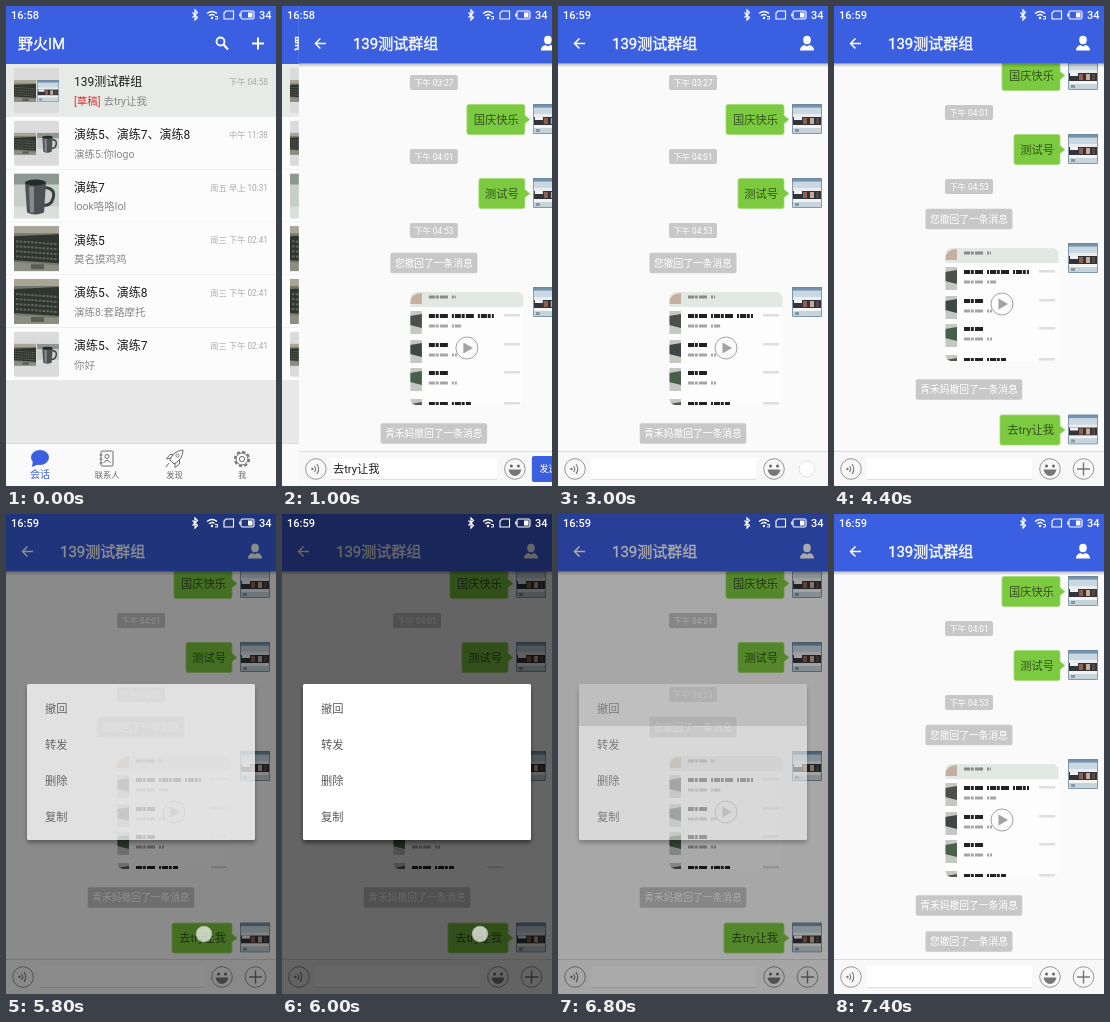
These frames come from a looping animation (270 by 480 pixels, 8000 ms). An HTML page:

```html
<!DOCTYPE html>
<html lang="zh-CN">
<head>
<meta charset="utf-8">
<title>野火IM</title>
<style>
  html, body { margin: 0; width: 100%; height: 100%; overflow: hidden; }
  svg { display: block; width: 100%; height: 100%; font-family: Roboto, 'Noto Sans CJK SC', 'Noto Sans CJK', sans-serif; }
</style>
</head>
<body>
<svg id="stage" viewBox="0 0 270 480" preserveAspectRatio="none"></svg>
<script>
const BLUE = '#3b5fe1', LOOP = 8000, STEP = 200;
const DRAFT = '去try让我';

// ---- drawing helpers ----
const rect = (x, y, w, h, fill, r = 0, more = '') =>
  `<rect x="${x}" y="${y}" width="${w}" height="${h}" rx="${r}" fill="${fill}" ${more}/>`;
const circle = (x, y, r, more) => `<circle cx="${x}" cy="${y}" r="${r}" ${more}/>`;
const line = (d, color, w = 1, more = '') =>
  `<path d="${d}" fill="none" stroke="${color}" stroke-width="${w}" ${more}/>`;
const shape = (d, fill) => `<path d="${d}" fill="${fill}"/>`;
const text = (x, cy, size, str, fill, anchor = 'start', more = '') =>
  `<text x="${x}" y="${cy + size * 0.37}" font-size="${size}" fill="${fill}" text-anchor="${anchor}" ${more}>${str}</text>`;
const heading = (x, str) => text(x, 37.7, 15, str, '#fff', 'start', 'stroke="#fff" stroke-width=".35"');
const group = (id, body) => `<g id="${id}">${body}</g>`;
const use = (id, x, y, s) => `<use href="#${id}" x="${x}" y="${y}" width="${s}" height="${s}"/>`;

// ---- shared pictures ----
const symbol = (id, size, body) => `<symbol id="${id}" viewBox="0 0 ${size} ${size}">${body}</symbol>`;
const keys = [15, 20, 25, 30].map(y =>
  line(`M2 ${y}L44 ${y + 3}`, '#5d665a', 2, 'stroke-dasharray="2.6 1.2"')).join('');
const defs = `<defs>
  ${symbol('keyboard', 45, rect(0, 0, 45, 45, '#75786c') + rect(0, 0, 45, 7, '#a9a594') +
    shape('M0 10L45 8V37L0 34Z', '#30362f') + keys + shape('M0 36L45 39V45H0Z', '#8d8e82') +
    rect(17, 38, 13, 5, '#5b5d55'))}
  ${symbol('cup', 45, rect(0, 0, 45, 45, '#c8ceca') + rect(0, 0, 45, 11, '#8d9792') +
    rect(0, 33, 45, 12, '#dcdeda') + line('M31 14Q42 15 39 25Q37 32 30 32', '#3b4040', 3) +
    shape('M11 9H32L30 39Q21 43 13 39Z', '#4c5153') + shape('M15 13H20L20 39H16Z', '#858b8c') +
    `<ellipse cx="21.5" cy="9" rx="10.5" ry="3" fill="#24292a"/>`)}
  ${symbol('screen', 30, rect(0, 0, 30, 30, '#b9cbd8') + rect(0, 0, 30, 3.5, '#7593ad') +
    rect(1, 4, 28, 6, '#c9d8e2') + rect(1, 10, 28, 4, '#e9edef') + rect(1, 13, 28, 8, '#33343a') +
    rect(2, 13, 8, 3, '#f2f2f2') + rect(11, 14, 4, 6, '#8f6052') + rect(18, 14, 4, 6, '#c8a994') +
    rect(24, 14, 3, 6, '#57484a') + rect(1, 21, 28, 3, '#f2f3f3') + rect(1, 24, 28, 5, '#c7d4dc') +
    rect(3, 25, 4, 3, '#8298a9') + rect(.4, .4, 29.2, 29.2, 'none', 1, 'stroke="#6d8497" stroke-width=".8"'))}
  <filter id="soft" x="-20%" y="-20%" width="140%" height="150%"><feGaussianBlur stdDeviation="2"/></filter>
  <clipPath id="photoClip">${rect(111.5, 286, 113, 113, '#000', 6)}</clipPath>
  <linearGradient id="shade" x2="0" y2="1"><stop stop-color="#000" stop-opacity=".25"/><stop offset="1" stop-color="#000" stop-opacity="0"/></linearGradient>
</defs>`;

// ---- conversation list ----
const rows = [
  ['139测试群组', DRAFT, '下午 04:58', 'keyboard', 'screen'],
  ['演练5、演练7、演练8', '演练5:你logo', '中午 11:38', 'keyboard', 'cup'],
  ['演练7', 'look咯咯lol', '周五 早上 10:31', 'cup'],
  ['演练5', '莫名摸鸡鸡', '周三 下午 02:41', 'keyboard'],
  ['演练5、演练8', '演练8:套路摩托', '周三 下午 02:41', 'keyboard'],
  ['演练5、演练7', '你好', '周三 下午 02:41', 'keyboard', 'cup'],
];
function listRow([name, last, time, a, b], i) {
  const y = 58 + 52.75 * i;
  const pic = b
    ? rect(8, y + 4, 45, 45, '#dadbda', 2) + use(a, 8, y + 16, 22) + use(b, 31, y + 16, 22)
    : use(a, 8, y + 4, 45);
  const sub = i ? text(68, y + 37, 10.5, last, '#888')
    : text(68, y + 37, 10.5, '[草稿]', '#e03030') + text(97.5, y + 37, 10.5, last, '#888');
  return rect(0, y, 270, 52.75, i ? '#fcfcfc' : '#e6ebe8') + rect(0, y + 52.4, 270, .6, '#e2e2e2') +
    pic + text(68, y + 18, 12, name, '#1c1c1c') + sub + text(262, y + 18, 8.25, time, '#aaa', 'end');
}
const GREY = '#6c6c6c';
const tabs =
  rect(0, 437, 270, 43, '#fafafa') + rect(0, 437, 270, .7, '#d0d0d0') +
  `<ellipse cx="34" cy="451.5" rx="9" ry="7.5" fill="${BLUE}"/>` + shape('M27 454L26 461L33 458Z', BLUE) +
  text(34, 468.5, 10, '会话', BLUE, 'middle') +
  rect(95, 445, 12, 15, 'none', 1, `stroke="${GREY}"`) + circle(101, 450.5, 2, `fill="none" stroke="${GREY}"`) +
  line('M97.5 457Q101 451.5 104.5 457M93.5 449h3M93.5 453h3M93.5 457h3', GREY) +
  line('M164 454Q167 445 177 444Q177 453 168 458ZM165 452L160.5 453L164 448.5L167 448.5M169 457V461.5L173.5 458V454M163 457L160 461', GREY) +
  circle(171.5, 449.5, 1.6, `fill="none" stroke="${GREY}" stroke-width=".8"`) +
  circle(236, 453, 7.2, `fill="none" stroke="${GREY}" stroke-width="1.8" stroke-dasharray="3.2 2.45"`) +
  circle(236, 453, 6, `fill="none" stroke="${GREY}"`) + circle(236, 453, 2.6, `fill="none" stroke="${GREY}"`) +
  [['联系人', 101], ['发现', 168.5], ['我', 236]].map(([s, x]) => text(x, 469, 8.25, s, GREY, 'middle')).join('');
const header = rect(0, 57.5, 270, 4, 'url(#shade)') + rect(0, 0, 270, 57.5, BLUE);
const list = rect(0, 0, 270, 480, '#e8e8e8') + rows.map(listRow).join('') + tabs +
  rect(0, 0, 270, 58, BLUE) + heading(12, '野火IM') +
  circle(214.5, 35.5, 4, 'fill="none" stroke="#fff" stroke-width="1.8"') +
  line('M217.5 38.5L222 43.5', '#fff', 2.2) + line('M246 37.5H258M252 31.5V43.5', '#fff', 2);

// ---- chat ----
const pill = (cy, w, h, size, str) =>
  rect(135 - w / 2, cy - h / 2, w, h, '#c8c8c8', 2) + text(135, cy, size, str, '#fff', 'middle');
const stamp = (cy, str) => pill(cy, 48, 15, 8.25, str);
const notice = (cy, str) => pill(cy, str.length * 9.75 + 9, 20.5, 9.75, str);
const bubble = (cy, left, str) =>
  `<path d="M${left + 2} ${cy - 15}H224Q226 ${cy - 15} 226 ${cy - 13}V${cy - 4}L231 ${cy}L226 ${cy + 4}V${cy + 13}Q226 ${cy + 15} 224 ${cy + 15}H${left + 2}Q${left} ${cy + 15} ${left} ${cy + 13}V${cy - 13}Q${left} ${cy - 15} ${left + 2} ${cy - 15}Z" fill="#7cca3f" stroke="#a2da78" stroke-width=".8"/>` +
  text(220, cy + .3, 11.25, str, '#33511f', 'end') + use('screen', 234, cy - 15.5, 30);

const smudge = (y, x2, color, w) => line(`M130 ${y}H${x2}`, color, w, 'stroke-dasharray="6 .8 3 1.2 8 4 2 1"');
const photo = `<g clip-path="url(#photoClip)">` + rect(111, 286, 114, 114, '#fdfdfd') +
  rect(111, 286, 114, 15, '#e2e8e4') + shape('M111 297Q112 287 123 287V298H111Z', '#c5b09f') + smudge(291, 157, '#8a8a8a', 3) +
  [[305, 195, 163, '#4c4f4c'], [334, 150, 158, '#3e4746'], [362, 149, 158, '#48604a'], [393, 172, 150, '#52584f']]
    .map(([y, a, b, c]) => rect(111, y, 12, 23, '#c3c8c3') + shape(`M111 ${y + 5}L123 ${y + 3}V${y + 17}L111 ${y + 14}Z`, c) +
      smudge(y + 5, a, '#222', 4) + smudge(y + 15, b, '#a5a5a5', 3) + rect(205, y + 3, 16, 2.5, '#dedede')).join('') + '</g>' +
  circle(168, 342, 11, 'fill="#fafafa" fill-opacity=".85" stroke="#a2a2a2"') +
  shape('M164.5 336.5L174 342L164.5 347.5Z', '#a2a2a2');

const feed = stamp(76.5, '下午 03:27') + bubble(113.5, 168, '国庆快乐') +
  stamp(150.5, '下午 04:01') + bubble(187.5, 180, '测试号') +
  stamp(224.5, '下午 04:53') + notice(257, '您撤回了一条消息') +
  photo + use('screen', 234, 281, 30) + notice(427.5, '青禾妈撤回了一条消息') +
  group('sent', bubble(468, 166, DRAFT)) + group('recalled', notice(463.5, '您撤回了一条消息'));

const ring = x => circle(x, 463, 10.3, 'fill="#f8f8f8" stroke="#8c8c8c" stroke-width=".9"');
const bar = rect(0, 445, 270, 35, '#f8f8f8') + rect(0, 445, 270, .7, '#cfcfcf') +
  ring(17) + circle(13.5, 463, 1.2, 'fill="#777"') +
  line('M15.5 460Q18 463 15.5 466M18 458Q21.5 463 18 468', '#777', 1.1) +
  rect(33, 452, 165, 22, '#fff') + rect(33, 473.3, 165, .7, '#d0d0d0') +
  group('draft', text(34, 463, 11.25, DRAFT, '#222')) +
  ring(216) + circle(212.5, 460, 1.5, 'fill="#666"') + circle(219.5, 460, 1.5, 'fill="#666"') +
  shape('M209.5 463.5H222.5Q221 470 216 470Q211 470 209.5 463.5Z', '#777') +
  group('send', rect(233, 450, 33.5, 26, BLUE, 2) + text(249.7, 463, 9, '发送', '#fff', 'middle')) +
  group('plus', ring(249.5) + line('M243 463H256M249.5 456.5V469.5', '#777', 1.4));

const chat = rect(0, 0, 270, 480, '#fafafa') + group('feed', feed) + bar + header +
  line('M27 37.5H16.5M21.5 32.5L16.5 37.5L21.5 42.5', '#fff', 1.5) + heading(54, '139测试群组') +
  `<ellipse cx="249" cy="34" rx="3.8" ry="4.2" fill="#fff"/>` +
  shape('M242 44.5Q242 40 246.5 39L249 40.5L251.5 39Q256 40 256 44.5Z', '#fff');

// ---- overlays ----
const dialog = rect(21, 173, 228, 156, '#000', 2, 'opacity=".45" filter="url(#soft)"') +
  rect(21, 170, 228, 156, '#fff', 1.5) + group('pressed', rect(21, 170, 228, 42, '#d2d2d2', 1.5)) +
  ['撤回', '转发', '删除', '复制'].map((s, i) => text(39, 194.5 + 36 * i, 11.25, s, '#5a5a5a')).join('');
const BOLD = 'font-weight="500"';
const status = `<text id="clock" x="5" y="13" font-size="11" fill="#fff" ${BOLD}></text>` +
  line('M186.5 6.5L191.5 11.5L189 14V4L191.5 6.5L186.5 11.5', '#fff', 1.2) +
  line('M201 7.5Q206 3.5 211 7.5M203 9.8Q206 7.3 208.5 9.5', '#fff', 1.3) + circle(206, 12, 1.2, 'fill="#fff"') +
  line('M209 10.5h2.5v2.5h-2.5', '#fff', 1) +
  line('M220 5H227.5V13H218V7Z', '#fff', 1.1) +
  rect(235, 5, 13, 8, 'none', 1.5, 'stroke="#fff" stroke-width="1.1"') + rect(242, 6.5, 4.5, 5, '#fff') + rect(233.2, 7.5, 1.5, 3, '#fff') +
  text(253, 9, 11, '34', '#fff', 'start', BOLD);

const stage = document.getElementById('stage');
stage.innerHTML = defs + group('list', list) + group('chat', chat) +
  `<rect id="dim" width="270" height="480"/>` + group('dialog', dialog) + status +
  circle(0, 0, 8, 'id="touch" fill="#fff" fill-opacity=".7" stroke="#999" stroke-opacity=".3" stroke-width=".8"');

// ---- timeline ----
const touches = [[200, 600, 150, 86], [2400, 3200, 249, 463], [5200, 6200, 198, 420], [6400, 6800, 43, 187]];
const el = id => document.getElementById(id);
const show = (id, on) => el(id).setAttribute('visibility', on ? 'visible' : 'hidden');
const fade = (id, a) => el(id).setAttribute('opacity', a);
const move = (id, x, y) => el(id).setAttribute('transform', `translate(${x} ${y})`);

function draw(t) {
  const ramp = (a, b) => Math.min(1, Math.max(0, (t - a) / (b - a)));
  const ease = (a, b) => 1 - (1 - ramp(a, b)) ** 2;
  const leave = 1 - ramp(6400, 7000) ** 2;

  move('chat', 270 * (1 - ease(400, 1200)), 0);
  move('feed', 0, -44 * ease(3000, 3600) + 8 * ease(7000, 7400));
  show('sent', t >= 3200 && t < 7200);
  show('recalled', t >= 7200);
  show('draft', t < 3000);
  show('send', t < 3000);
  show('plus', t >= 3200);
  fade('dim', 0.6 * ease(5600, 6000) * leave);
  fade('dialog', ease(5600, 6000) * leave);
  fade('pressed', t >= 6400 ? 1 : 0);
  el('clock').textContent = t < 3000 ? '16:58' : '16:59';

  const touch = touches.find(([a, b]) => t >= a && t < b);
  show('touch', touch);
  if (touch) move('touch', touch[2], touch[3]);
}
function tick() {
  const t = performance.now() % LOOP;
  draw(Math.floor(t / STEP) * STEP);
  requestAnimationFrame(tick);
}
tick();
</script>
</body>
</html>
```
